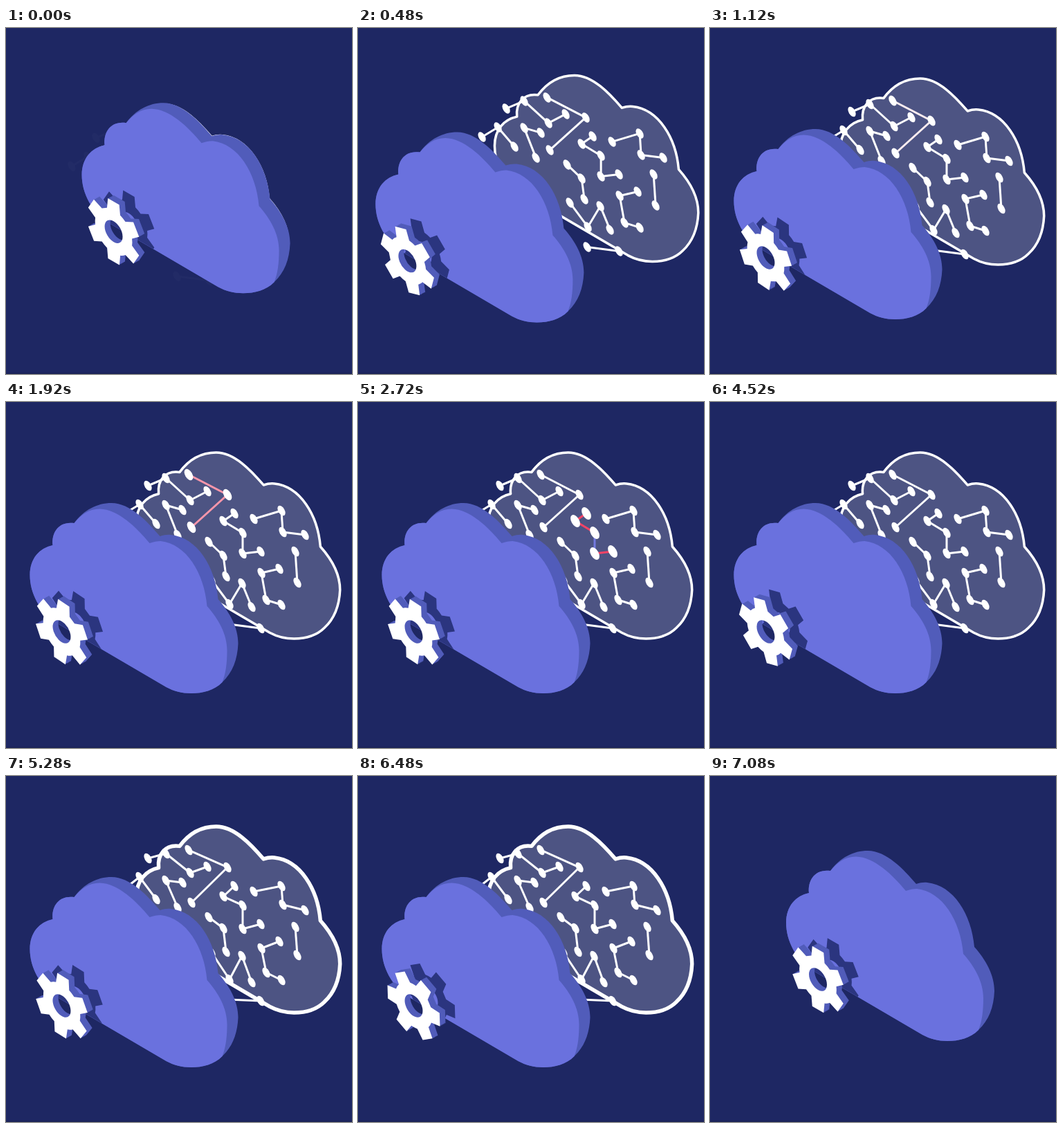
An HTML page for the animation above (7.16 s loop, 500x500 px).

```html
<!DOCTYPE html>
<html lang="en">
<head>
<meta charset="utf-8">
<title>Cloud settings</title>
<style>
  html, body { margin: 0; width: 100%; height: 100%; overflow: hidden; background: #1e2763; }
  svg { display: block; width: 100vw; height: 100vh; }
</style>
</head>
<body>
<svg id="stage" viewBox="0 0 500 500">
  <defs>
    <path id="body" d="M110 212C110 188 124 173 143 169C141 150 152 134 174 137C188 118 207 108 228 108
      C255 108 280 135 298 156C304 154 309 153.5 314 154C352 158 378 200 382 247C399 266 411 288 411 311
      C410 334 403 353 388 367C376 379 360 383 343 383C330 383 318 380 307 374L150 282C124 266 110 238 110 212Z"/>
    <path id="face" d="M110 212C110 188 124 173 143 169C141 150 152 134 174 137C184 125 195 116.5 211 116.5
      C237 117 264 143 283 166C289 164 294 163 299 163C336 167 362 209 366 257C383 276 395 298 395 321
      C395 340 393 355 388 367C376 379 360 383 343 383C330 383 318 380 307 374L150 282C124 266 110 238 110 212Z"/>
    <clipPath id="onFace"><use href="#face"/></clipPath>
  </defs>
  <rect width="500" height="500" fill="#1e2763"/>
  <rect y="498" width="500" height="2" fill="#1b2358"/>
  <g id="back">
    <use id="outline" href="#body" fill="#4d5483" stroke="#fff" stroke-linejoin="round"
      transform="translate(335.5 207.5) scale(.978) translate(-260.5 -245.5)"/>
    <g id="net"></g>
  </g>
  <g id="front">
    <use href="#body" fill="#515cba"/>
    <use href="#face" fill="#6a71de"/>
    <g id="shade" clip-path="url(#onFace)"></g>
    <g id="gear"></g>
  </g>
</svg>
<script>
const LOOP = 7160;
const SHIFT = { x: 75.5, y: 38 };
const HOT = [[245, 54, 92], [106, 113, 222]];

// Circuits: points, direction of the first sway, start of the highlight
const CIRCUITS = [
  { pts: [205,121, 231,110, 266,142, 291,129], sway: -1 },
  { pts: [170,162, 193,148, 217,176], sway: 1 },
  { pts: [255,156, 231,149, 248,192], sway: -1 },
  { pts: [264,105, 320,134, 268,181], sway: 1, hotAt: 1000, plain: true },
  { pts: [330,161, 314,172, 342,189, 342,219, 368,216], sway: -1, hotAt: 2000, mid: 2 },
  { pts: [358,169, 398,157, 400,188, 432,192], sway: -1 },
  { pts: [418,216, 421,261], sway: 1 },
  { pts: [395,241, 369,247, 376,286, 398,293], sway: -1, hotAt: 3000, mid: 1 },
  { pts: [293,202, 314,222, 318,252], sway: 1 },
  { pts: [297,257, 323,292, 341,262, 355,296], sway: -1 },
  { pts: [322,321, 368,327], sway: 1 }
];

// Gear turn: time, degrees
const TURN = [[0, 0], [1120, -175], [2720, -416], [3680, -561], [5280, -777], [6480, -992], [7080, -1080]];

const $ = id => document.getElementById(id);
const clamp = v => Math.max(0, Math.min(1, v));

function add(parent, tag, attrs) {
  const el = document.createElementNS('http://www.w3.org/2000/svg', tag);
  set(el, attrs);
  parent.appendChild(el);
  return el;
}

function set(el, attrs) {
  for (const k in attrs) el.setAttribute(k, attrs[k]);
}

function gearPath() {
  const tip = 43.5, root = 31, hole = 15;
  let d = '';
  for (let i = 0; i < 6; i++) {
    const a = i * Math.PI / 3 - Math.PI / 2;
    const at = (r, w) => {
      const x = r * Math.cos(a) - w * Math.sin(a), y = r * Math.sin(a) + w * Math.cos(a);
      return x.toFixed(2) + ' ' + y.toFixed(2);
    };
    d += (i ? `A${root} ${root} 0 0 1 ` : 'M') + at(root - 2, -11);
    d += 'L' + at(tip, -9.5) + 'L' + at(tip, 9.5) + 'L' + at(root - 2, 11);
  }
  return d + `ZM${hole} 0A${hole} ${hole} 0 1 0 ${-hole} 0A${hole} ${hole} 0 1 0 ${hole} 0Z`;
}

const gears = [];
const shape = gearPath();
function addGear(parent, dx, dy, fill) {
  const el = add(parent, 'path', { d: shape, fill, 'fill-rule': 'evenodd' });
  gears.push({ el, x: 156 + dx, y: 294 + dy });
}
addGear($('shade'), 22, -11.5, '#2b357f');
for (let k = 8; k > 0; k--) addGear($('gear'), k, -k * 0.56, '#515cba');
addGear($('gear'), 0, 0, '#fff');

for (const c of CIRCUITS) {
  c.nodes = [];
  for (let i = 0; i < c.pts.length; i += 2) c.nodes.push({ x: c.pts[i], y: c.pts[i + 1] });
  c.lines = c.nodes.slice(1).map(() => add($('net'), 'line', { 'stroke-width': 3 }));
  c.dots = c.nodes.map(() => add($('net'), 'circle', { fill: '#fff' }));
}

function outBack(t) {
  const u = t - 1;
  return 1 + 2.9 * u ** 3 + 1.9 * u ** 2;
}

function inOut(t) {
  return t < 0.5 ? 4 * t ** 3 : 1 - 4 * (1 - t) ** 3;
}

function spread(t) {
  if (t < 6480) return outBack(clamp(t / 840));
  return 1 - inOut(clamp((t - 6480) / 600));
}

function turn(t) {
  for (let i = 1; i < TURN.length; i++) {
    const [t0, a0] = TURN[i - 1], [t1, a1] = TURN[i];
    if (t <= t1) return a0 + (a1 - a0) * (t - t0) / (t1 - t0);
  }
  return 0;
}

// Two swells of 800 ms
function swell(t) {
  if (t < 5080 || t > 6680) return 0;
  return Math.sin(Math.PI * (t - 5080) / 800) ** 2;
}

function heat(c, t) {
  if (!c.hotAt) return 0;
  return Math.sin(Math.PI * clamp((t - c.hotAt) / 1240)) ** 2;
}

function mix(rgb, k) {
  return 'rgb(' + rgb.map(v => Math.round(255 + (v - 255) * k)).join() + ')';
}

function drawCircuit(c, t, beat) {
  const hot = heat(c, t);
  const pos = c.nodes.map((n, i) => ({ x: n.x, y: n.y + c.sway * (i % 2 ? -1 : 1) * 4 * beat }));
  c.lines.forEach((line, i) => {
    const p = pos[i], q = pos[i + 1];
    const tone = HOT[i === c.mid ? 1 : 0];
    set(line, { x1: p.x, y1: p.y, x2: q.x, y2: q.y, stroke: mix(tone, hot) });
  });
  c.dots.forEach((dot, i) => {
    set(dot, { r: 6.5 + 1.6 * hot, transform: `matrix(.866 .5 0 1 ${pos[i].x} ${pos[i].y})` });
  });
}

function draw(t) {
  const p = spread(t), beat = swell(t);
  set($('front'), { transform: `translate(${-SHIFT.x * p} ${SHIFT.y * p})` });
  set($('back'), {
    transform: `translate(${SHIFT.x * (p - 1)} ${SHIFT.y * (1 - p)})`,
    visibility: p > 0.001 ? 'visible' : 'hidden'
  });
  set($('outline'), { 'stroke-width': 3.6 + 4 * beat });
  set($('net'), { opacity: clamp(p * 2.5) });
  for (const c of CIRCUITS) drawCircuit(c, t, beat);
  const a = turn(t);
  for (const g of gears) set(g.el, { transform: `matrix(.866 .5 0 1 ${g.x} ${g.y}) rotate(${a})` });
}

const start = performance.now();
function tick() {
  draw((performance.now() - start) % LOOP);
  requestAnimationFrame(tick);
}
tick();
</script>
</body>
</html>
```
